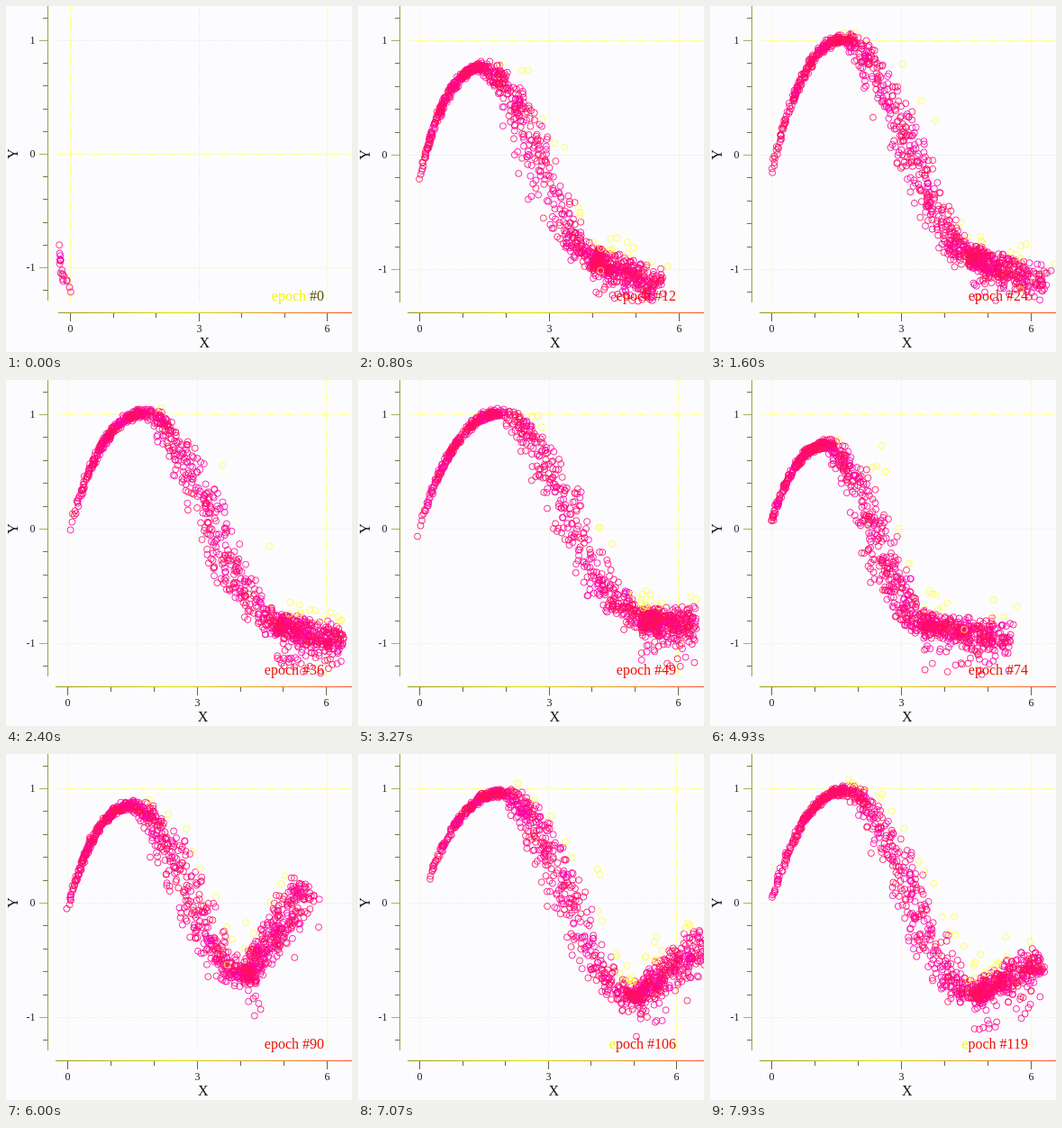
These frames come from a looping animation (384 px wide and 384 px high, 8000 ms). An HTML page:

```html
<!DOCTYPE html>
<html lang="en">
<head>
<meta charset="utf-8">
<title>Training epochs</title>
<style>
  html, body { margin: 0; width: 100%; height: 100%; overflow: hidden; background: #fcfcff; }
  svg { display: block; width: 100%; height: 100%; font-family: "Liberation Serif", serif; }
  path { fill: none; }
  text { font-size: 16px; fill: #111; }
  .tick { font-size: 12px; fill: #222; }
  .yellow { fill: #f4f400; }
  .red { fill: #f01000; }
</style>
</head>
<body>
<svg viewBox="0 0 384 384">
  <defs>
    <linearGradient id="bottom" gradientUnits="userSpaceOnUse" x1="55" y1="0" x2="384" y2="0">
      <stop offset="0" stop-color="#99991a"/>
      <stop offset=".4" stop-color="#e0e000"/>
      <stop offset=".7" stop-color="#e0a020"/>
      <stop offset="1" stop-color="#ff5030"/>
    </linearGradient>
  </defs>
  <g id="plot"></g>
</svg>
<script>
const LOOP = 8000, EPOCHS = 120, RADIUS = 3.5;
const COLORS = ['#ff0090', '#ff0070', '#ff00b0', '#ff1058'];
const YELLOW = '#ffff40';
const plot = document.getElementById('plot');

// Milestones of the learned curve; the cloud drifts from one to the next.
const MILESTONES = [
  { epoch: 0, start: [59, 262], peakY: 282, valley: [64, 302], end: [78, 324] },
  { epoch: 24, start: [68, 192], peakY: 37, valley: [290, 277], end: [372, 314] },
  { epoch: 49, start: [67, 175], peakY: 37, valley: [315, 266], end: [376, 272] },
  { epoch: 74, start: [67, 165], peakY: 72, valley: [238, 271], end: [334, 290] },
  { epoch: 90, start: [66, 185], peakY: 57, valley: [266, 248], end: [334, 145] },
  { epoch: 106, start: [77, 148], peakY: 43, valley: [305, 272], end: [388, 207] },
  { epoch: 119, start: [68, 169], peakY: 41, valley: [294, 268], end: [368, 230] }
];

function random(seed) {
  let s = seed * 7919 + 17;
  return () => {
    s = (s + 0x6D2B79F5) | 0;
    let t = Math.imul(s ^ (s >>> 15), 1 | s);
    t = (t + Math.imul(t ^ (t >>> 7), 61 | t)) ^ t;
    return ((t ^ (t >>> 14)) >>> 0) / 4294967296;
  };
}

const mix = (a, b, p) => a + (b - a) * p;
const mixPoint = (a, b, p) => a.map((v, i) => mix(v, b[i], p));

function shapeAt(epoch) {
  const next = Math.max(1, MILESTONES.findIndex(m => m.epoch >= epoch));
  const a = MILESTONES[next - 1], b = MILESTONES[next];
  let p = (epoch - a.epoch) / (b.epoch - a.epoch);
  if (next === 1) p = 1 - (1 - p) ** 3;
  const start = mixPoint(a.start, b.start, p), valley = mixPoint(a.valley, b.valley, p);
  const peak = [mix(start[0], valley[0], .36), mix(a.peakY, b.peakY, p)];
  return { start, peak, valley, end: mixPoint(a.end, b.end, p) };
}

// Three stretches: a sine rise, a cosine fall and a straight tail.
const STRETCHES = [
  { from: 'start', to: 'peak', ease: p => Math.sin(p ** .8 * Math.PI / 2), spread: p => 2 + 4 * p },
  { from: 'peak', to: 'valley', ease: p => (1 - Math.cos(Math.PI * p)) / 2, spread: p => 7 + 15 * Math.sin(Math.PI * p) + 8 * p },
  { from: 'valley', to: 'end', ease: p => p, spread: p => 15 + 13 * p }
];

function pointOn(shape, { from, to, ease }, p) {
  const a = shape[from], b = shape[to];
  return [mix(a[0], b[0], p), mix(a[1], b[1], ease(p))];
}

const ring = (x, y) => `M${(x + RADIUS).toFixed(1)} ${y.toFixed(1)}a3.5 3.5 0 1 0-7 0a3.5 3.5 0 1 0 7 0`;

function cloud(epoch, shape) {
  const rnd = random(epoch), count = epoch ? 1050 : 20;
  const scale = Math.min(1, .2 + (shape.end[0] - shape.start[0]) / 320);
  const layers = [...COLORS, YELLOW].map(color => ({ color, d: '' }));
  for (let n = 0; n < count; n++) {
    const pick = rnd();
    const part = pick < .24 ? 0 : pick < .62 ? 1 : 2;
    const p = rnd() ** [.7, 1, 1.4][part];
    const stretch = STRETCHES[part];
    let [x, y] = pointOn(shape, stretch, p);
    const [nx, ny] = pointOn(shape, stretch, p + .01);
    const slope = Math.hypot(nx - x, ny - y) || 1;
    let off = (rnd() + rnd() + rnd() - 1.5) / 1.3;
    if (part && rnd() < .05) off = Math.abs(off) * 2.2;
    const push = off * stretch.spread(p) * scale / slope;
    x += (ny - y) * push;
    y -= (nx - x + (ny - y) * push) * push;
    if (part === 2 && rnd() < .1) y += 45 * rnd() * scale;
    const layer = part && off > .88 ? COLORS.length : Math.floor(rnd() * COLORS.length);
    if (y < 328) layers[layer].d += ring(x, y);
  }
  return layers.map(({ d, color }) => line(d, color, 'stroke-width=".85"')).join('');
}

const line = (d, color, extra = '') => `<path d="${d}" stroke="${color}" ${extra}/>`;
const label = (x, y, s, anchor, cls = '') =>
  `<text x="${x}" y="${y}" text-anchor="${anchor}" class="${cls}">${s}</text>`;

// The axes settle right after the first epoch and shrink when the tail runs far right.
function axes(first, tailX) {
  const unit = first ? 47.5 : 48 - Math.max(0, tailX - 370) / 36;
  const x0 = first ? 71 : 68, y0 = first ? 164 : 165, rise = first ? 126 : 127;
  const left = first ? 58 : 55, bottom = first ? 327 : 329;
  const gridColor = faint => faint ? '#e8e8ec' : '#ffff50';
  const dots = 'stroke-dasharray="1 1"';
  let out = '';
  for (let k = -6; k <= 6; k++) {
    const y = Math.round(y0 - k * rise / 5) + .5, major = k % 5 === 0;
    if (major) {
      out += line(`M${left} ${y}H384`, gridColor(k === (first ? 5 : 0)), dots);
      out += label(32.5, y + 3.5, k / 5, 'end', 'tick');
    }
    out += line(`M46 ${y}H${major ? 37 : 41}`, major ? '#b0b050' : '#777740');
  }
  for (let k = 0; k <= 6; k++) {
    const x = Math.round(x0 + k * unit) + .5, major = k % 3 === 0;
    if (major) {
      out += line(`M${x} 0V${bottom}`, gridColor(k === 3), dots);
      out += label(x, 362, k, 'middle', 'tick');
    }
    out += line(`M${x} 341V${major ? 350 : 346}`, '#666640');
  }
  out += line(`M46.5 0V${bottom}`, '#a0a038') + line(`M${left} 340.5H384`, 'url(#bottom)');
  out += label(x0 + 3 * unit + 6.8, 379, 'X', 'middle');
  return out + `<text transform="translate(13 ${y0}) rotate(-90)" text-anchor="middle">Y</text>`;
}

function caption(epoch) {
  if (epoch === 0) return label(353, 327, 'epoch <tspan fill="#55500a">#0</tspan>', 'end', 'yellow');
  const lead = epoch >= 100 ? 'yellow' : 'red';
  return label(353, 327, `<tspan class="${lead}">e</tspan>poch #${epoch}`, 'end', 'red');
}

function draw(epoch) {
  const shape = shapeAt(epoch);
  plot.innerHTML = axes(epoch === 0, shape.end[0]) + cloud(epoch, shape) + caption(epoch);
}

let shown = -1;
function tick() {
  const time = performance.now() % LOOP;
  const epoch = Math.floor((time + 4) * EPOCHS / LOOP) % EPOCHS;
  if (epoch !== shown) draw(shown = epoch);
  requestAnimationFrame(tick);
}
tick();
</script>
</body>
</html>
```
